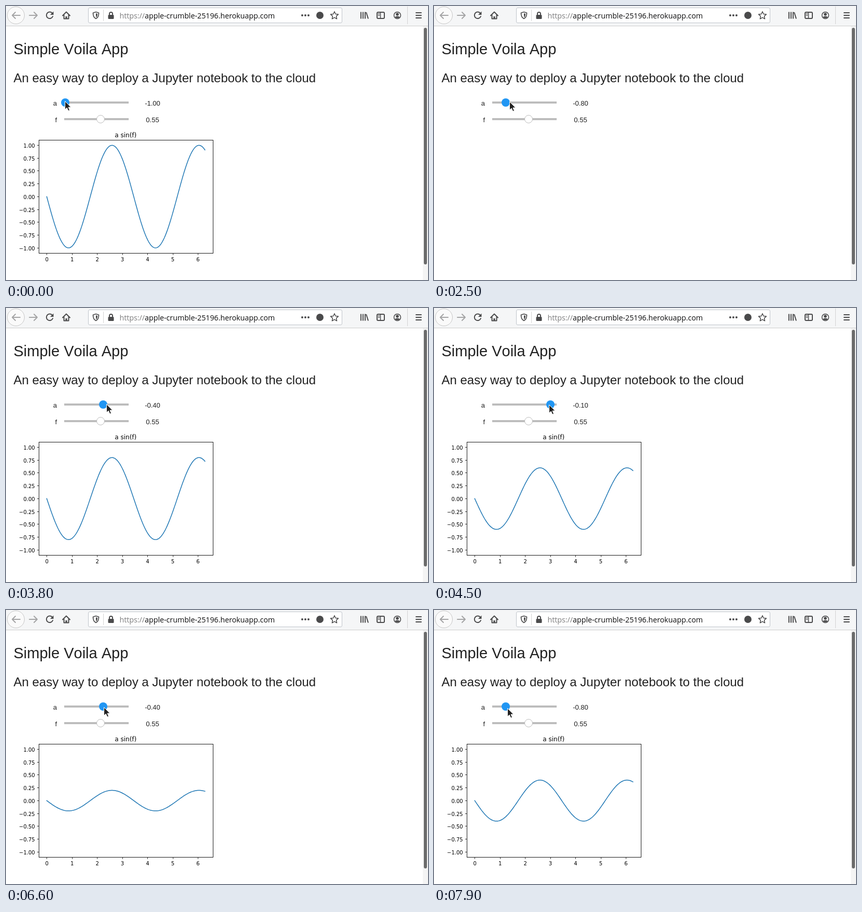
These frames come from a looping animation (812 px wide and 528 px high, 8000 ms). An HTML page:

```html
<!DOCTYPE html>
<html lang="en">
<head>
<meta charset="utf-8">
<title>Simple Voila App</title>
<style>
  html, body { margin: 0; width: 100%; height: 100%; overflow: hidden; background: #fff; }
  svg { display: block; }
  .page { font-family: "Liberation Sans", Arial, sans-serif; font-kerning: none; fill: #212121; }
  .url { font: 14.24px "Open Sans", "Noto Sans", sans-serif; fill: #0c0c0d; }
  .plot { font: 10px "DejaVu Sans", sans-serif; fill: #000; }
  .icon { fill: none; stroke: #4a4a4b; stroke-width: 2; stroke-linejoin: round; stroke-linecap: round; }
  .solid { fill: #4a4a4b; stroke: none; }
  .off { stroke: #a5a5a6; }
</style>
</head>
<body>
<svg width="812" height="528" viewBox="0 0 812 528">
  <rect width="812" height="528" fill="#fff"/>
  <rect width="812" height="38" fill="#f5f6f7"/>
  <rect y="38" width="812" height="1" fill="#ccc"/>
  <rect x="158.5" y="3.5" width="488" height="29" rx="2.5" fill="#fff" stroke="#bfc4ca"/>
  <circle cx="19" cy="18" r="16.5" fill="#fafafa" stroke="#c6c6c6"/>
  <path d="M187.5 7V29M772.5 1V35" stroke="#d2d2d3"/>

  <g class="icon">
    <path class="off" d="M27 18H12M18 12L12 18L18 24M45 18H60M54 12L60 18L54 24"/>
    <path d="M89.5 14.5A6.3 6.3 0 1 0 90 20"/>
    <path class="solid" d="M91.5 10.5V17H85Z"/>
    <path d="M109 18.5L116 11.5L123 18.5M111.5 17.5V24.5H120.5V17.5"/>
    <path class="solid" d="M114.5 20H117.5V25H114.5Z"/>
    <path stroke-width="1.7" d="M173 11.5L178.5 13.2C178.5 19 177 22.5 173 24.5C169 22.5 167.5 19 167.5 13.2Z"/>
    <path class="solid" d="M173 14L176 15C176 18.5 175 21 173 22Z"/>
    <rect class="solid" x="196.5" y="17" width="11" height="8" rx="1.5"/>
    <path d="M199 17V15A3 3 0 0 1 205 15V17"/>
    <g class="solid">
      <circle cx="570" cy="18" r="2"/><circle cx="576" cy="18" r="2"/><circle cx="582" cy="18" r="2"/>
      <circle cx="604" cy="18" r="7"/>
    </g>
    <path id="star" stroke-width="1.5"/>
    <path stroke-linecap="butt" d="M683 11.5V24.5M687 11.5V24.5M691 11.5V24.5M693 12L697 24.5"/>
    <rect x="714" y="12" width="14" height="12" rx="2"/>
    <path stroke-width="1.5" d="M720.5 12V24M716.5 15H718.5M716.5 18H718.5"/>
    <circle cx="753" cy="18" r="6.5" stroke-width="1.5"/>
    <circle class="solid" cx="753" cy="16" r="2.8"/>
    <path class="solid" d="M748.5 21.5C749 19 757 19 757.5 21.5C755 24 751 24 748.5 21.5Z"/>
    <path d="M789 13H799M789 18H799M789 23H799"/>
  </g>
  <text class="url" x="218.5" y="24"><tspan fill="#7c7c7d">https://</tspan>apple-crumble-25196.herokuapp.com</text>

  <rect x="802" y="39" width="10" height="489" fill="#f4f4f4"/>
  <rect x="804" y="42" width="6" height="456" rx="3" fill="#6b6b6b"/>

  <g class="page">
    <text x="14.5" y="93" font-size="29">Simple Voila App</text>
    <text x="14.5" y="147" font-size="24">An easy way to deploy a Jupyter notebook to the cloud</text>
    <g font-size="13">
      <text x="98" y="192" text-anchor="end">a</text>
      <text x="98" y="224" text-anchor="end">f</text>
      <text id="value" x="282" y="192" text-anchor="middle"></text>
      <text x="282" y="224" text-anchor="middle">0.55</text>
    </g>
  </g>
  <path d="M112 186H236M112 218H236" stroke="#bdbdbd" stroke-width="4"/>
  <circle id="handle" cy="186" r="8" fill="#2196f3"/>
  <circle cx="182" cy="218" r="7.5" fill="#fff" stroke="#bdbdbd"/>

  <g id="plot" class="plot">
    <text x="230.3" y="252.5" font-size="12" text-anchor="middle">a sin(f)</text>
    <g id="ticks"></g>
    <path id="curve" fill="none" stroke="#1f77b4" stroke-width="1.5" stroke-linejoin="round" stroke-linecap="square"/>
    <rect x="63.5" y="258.5" width="335" height="218" fill="none" stroke="#000" stroke-width=".9"/>
  </g>

  <path id="cursor" d="M0 0V16L3.7 12.6L6.3 18.6L9 17.4L6.5 11.6H11.5Z" fill="#222" stroke="#fff"/>
</svg>
<script>
const $ = id => document.getElementById(id);
const LOOP = 8000, TICK = 100, FREQ = 0.55;

// The output is cleared at a steady pace, then shows the slider as it was LAG earlier.
const FIRST_CLEAR = 1600, PERIOD = 795, BLANK = 220, LAG = 770;

// The drag: a nudge, a sweep to the right, a pause and a sweep back.
const drag = [
  { t: 0, x: 113, y: 184 },
  { t: 1000, x: 114, y: 184 },
  { t: 1400, x: 126, y: 184 },
  { t: 1900, x: 126, y: 184 },
  { t: 4500, x: 221, y: 187 },
  { t: 5700, x: 216, y: 187 },
  { t: 7900, x: 141, y: 190 },
];

const px = x => 78.4 + x * 48.44;
const py = y => 367.3 - y * 98.84;

function pointerAt(t) {
  const next = drag.findIndex(key => key.t > t);
  if (next < 0) return drag[drag.length - 1];
  const from = drag[next - 1], to = drag[next];
  const k = ((t - from.t) / (to.t - from.t)) ** 1.11;
  return { x: from.x + (to.x - from.x) * k, y: from.y + (to.y - from.y) * k };
}

// Slider position in steps of 0.1, from 0 (-1.00) to 10 (0.00)
function notchAt(t) {
  const notch = Math.round((pointerAt(t).x - 116) / 12.25);
  return Math.min(10, Math.max(0, notch));
}

const amplitudeAt = t => (notchAt(t) - 10) / 10;

function plottedAmplitude(t) {
  if (t < FIRST_CLEAR) return amplitudeAt(0);
  const phase = (t - FIRST_CLEAR) % PERIOD;
  return phase < BLANK ? null : amplitudeAt(t - phase - LAG);
}

function curvePath(amp) {
  const points = Array.from({ length: 200 }, (_, i) => {
    const x = i / 199 * 2 * Math.PI;
    return px(x).toFixed(2) + " " + py(amp * Math.sin(x / FREQ)).toFixed(2);
  });
  return "M" + points.join("L");
}

function buildTicks() {
  let marks = "";
  const line = d => `<path d="${d}" stroke="#000" stroke-width=".8"/>`;
  for (let n = 0; n <= 6; n++) {
    const x = Math.round(px(n)) + 0.5;
    marks += line(`M${x} 476.5v3.5`) + `<text x="${px(n) + 0.3}" y="492" text-anchor="middle">${n}</text>`;
  }
  for (let n = -4; n <= 4; n++) {
    const y = Math.floor(py(n / 4)) + 0.5;
    const label = (n / 4).toFixed(2).replace("-", "\u2212");
    marks += line(`M63.5 ${y}h-3.5`) + `<text x="55.7" y="${y + 4}" text-anchor="end">${label}</text>`;
  }
  $("ticks").innerHTML = marks;
}

function buildStar() {
  const points = Array.from({ length: 10 }, (_, i) => {
    const r = i % 2 ? 3.7 : 7.8, angle = i * Math.PI / 5;
    return (632 + r * Math.sin(angle)) + " " + (18.5 - r * Math.cos(angle));
  });
  $("star").setAttribute("d", "M" + points.join("L") + "Z");
}

function draw(time) {
  const t = Math.floor((time % LOOP) / TICK) * TICK;
  const { x, y } = pointerAt(t);
  const amp = plottedAmplitude(t);
  $("cursor").setAttribute("transform", `translate(${Math.round(x) + 0.5} ${Math.round(y) - 0.5})`);
  $("handle").setAttribute("cx", 114 + Math.round(notchAt(t) * 12.2));
  $("value").textContent = amplitudeAt(t).toFixed(2);
  $("plot").style.display = amp === null ? "none" : "";
  if (amp !== null) $("curve").setAttribute("d", curvePath(amp));
}

buildTicks();
buildStar();
const begin = performance.now();
function frame() {
  draw(performance.now() - begin);
  requestAnimationFrame(frame);
}
frame();
</script>
</body>
</html>
```
